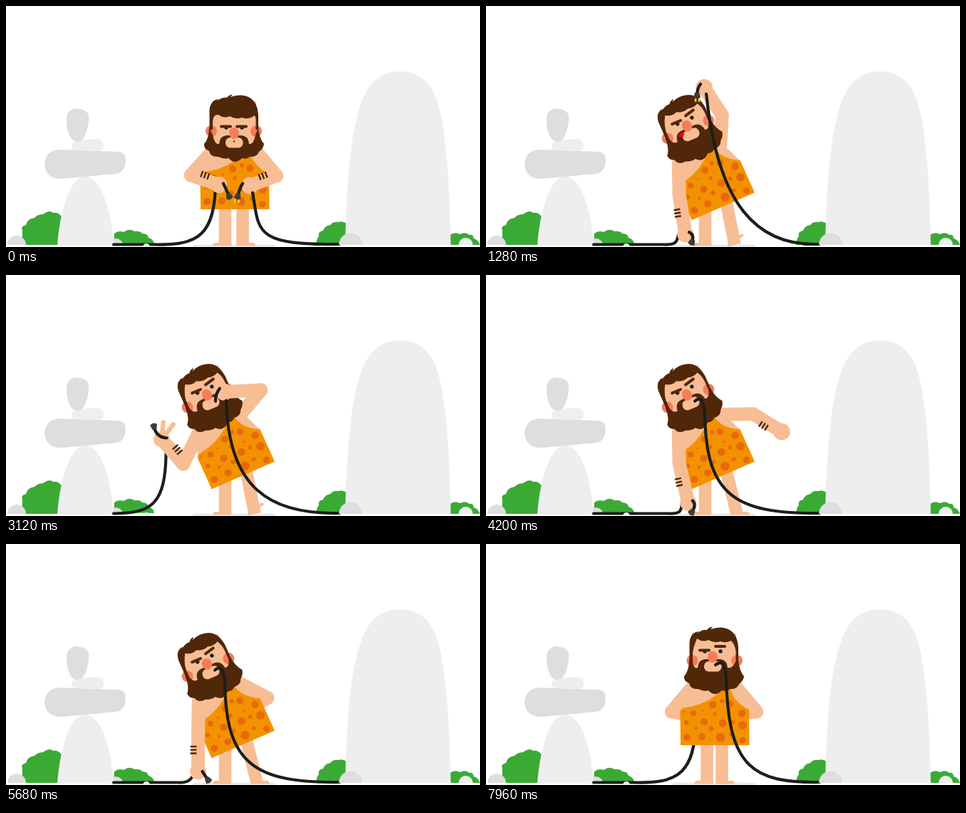
Write an HTML page that moves like this. It is 665 by 339 pixels and loops after 8000 ms.

```html
<!DOCTYPE html>
<html lang="en">
<head>
<meta charset="utf-8">
<title>Caveman with cables</title>
<style>
html, body { margin: 0; width: 100%; height: 100%; overflow: hidden; background: #fff; }
svg { display: block; width: 100%; height: 100%; }
.line { fill: none; stroke: #1d1d1b; stroke-width: 4.2; stroke-linecap: round; stroke-linejoin: round; }
.arm { stroke: #f7be95; stroke-width: 19; stroke-linecap: round; }
.leg { stroke: #f7be95; stroke-width: 17.6; }
.finger { stroke: #f7be95; stroke-width: 6.5; stroke-linecap: round; }
.mark { fill: none; stroke: #512709; stroke-width: 2.4; }
.brow { stroke: #512709; stroke-width: 4; stroke-linecap: round; }
.skin { fill: #f7be95; }
.hairy { fill: #512709; }
.pink { fill: #f47c5c; }
.dark { fill: #dedede; }
.pale { fill: #eeeeee; }
.bush { fill: #3aaa35; }
.clip { fill: #3c3c3b; }
</style>
</head>
<body>
<svg viewBox="0 0 665 339">
  <g id="scene">
    <path class="bush" d="M22 336L23 316Q20 310 28 308Q30 299 40 298Q44 293 52 293Q60 286 67 291Q73 290 78 296V336Z"/>
    <path class="dark" d="M2 336A13 13 0 0 1 28 336Z"/>
    <path class="bush" d="M151 334L152 320Q158 315 165 318Q173 312 180 317Q188 316 191 320Q199 320 200 326Q207 328 208 335Z"/>
    <path class="dark" d="M150 335V327Q162 326 164 335Z"/>
    <path class="pale" d="M72 337C75 290 90 240 110 240C135 240 148 290 151 337Z"/>
    <path class="dark" d="M54 222Q56 203 75 202L158 205Q168 206 168 217Q167 234 155 236L78 243Q56 244 54 222Z"/>
    <path class="pale" d="M92 197Q92 190 100 189L128 187Q137 188 137 197Q136 205 128 204L98 203Q92 202 92 197Z"/>
    <path class="dark" d="M85 158Q86 145 99 144Q113 145 116 153Q117 168 111 182Q107 191 99 191Q92 190 88 180Q84 168 85 158Z"/>
    <path class="bush" d="M435 336Q436 326 439 324Q437 317 445 316Q447 309 455 308Q459 303 466 304Q472 302 478 306V336Z"/>
    <path class="bush" d="M623 336V322Q630 317 637 321Q645 317 650 322Q656 321 656 327Q662 328 665 336Z"/>
    <path class="pale" d="M476 336C478 230 486 160 503 125Q518 92 553 92Q588 92 603 128C616 165 622 230 624 336Z"/>
    <path class="pale" d="M635 336A10 10 0 0 1 655 336Z"/>
    <rect x="262" y="335.5" width="116" height="3.5" rx="1.7" fill="#ebebeb"/>
  </g>
  <line id="upperR" class="arm"/>
  <g id="backSlot"></g>
  <line id="legL" class="leg" y1="275" y2="336"/>
  <line id="legR" class="leg" y1="275" y2="336"/>
  <path id="footL" class="skin" d="M8.7 1.5V-3H-13.5Q-17.5 -3 -17.5 1.5Z"/>
  <path id="footR" class="skin" d="M-8.7 1.5V-3H14Q18 -3 18 1.5Z"/>
  <g id="torso">
    <path class="skin" d="M288 193H352L369 234H273Z"/>
    <path fill="#f39200" d="M272.5 236Q273 231 280 230Q310 226 330 206L343 204Q347 222 369 233L369.5 283H273Z"/>
    <g id="spots" fill="#e8690b"></g>
  </g>
  <g id="frontSlot">
    <g id="left">
      <path id="cableL" class="line"/>
      <line id="upperL" class="arm"/>
      <line id="foreL" class="arm"/>
      <circle id="handL" class="skin" r="11.5"/>
      <line id="finger1" class="finger"/>
      <line id="finger2" class="finger"/>
      <path id="markL" class="mark"/>
      <path id="endL" class="line"/>
      <path id="clipL" class="clip" d="M-4 -3L3 -5L5 0L3 5L-4 3Z"/>
    </g>
  </g>
  <g id="head">
    <rect class="skin" x="289" y="126" width="62" height="64"/>
    <circle id="earL" class="pink" r="8"/>
    <circle id="earR" class="pink" r="8"/>
    <path id="hair" class="hairy"/>
    <path id="beard" class="hairy"/>
    <g id="face">
      <rect class="skin" x="308" y="165" width="24.5" height="14.5" rx="6.5"/>
      <path id="tongue" fill="#e30613" d="M303 168Q308 162 313 166L309 171Z"/>
      <circle id="lips" class="hairy" cx="320" cy="170.5" r="1.2"/>
      <circle cx="309" cy="151" r="2.7" fill="#1d1d1b"/>
      <circle cx="331" cy="151" r="2.7" fill="#1d1d1b"/>
      <line id="browL" class="brow" x1="302" x2="315"/>
      <line id="browR" class="brow" x1="324" x2="337"/>
      <ellipse class="pink" cx="320" cy="159" rx="7" ry="8"/>
    </g>
  </g>
  <g id="foreSlot">
    <g id="right">
      <line id="foreR" class="arm"/>
      <circle id="handR" class="skin" r="12"/>
      <path id="markR" class="mark"/>
    </g>
  </g>
  <path id="cableR" class="line"/>
  <path id="endR" class="line"/>
  <g id="clipR">
    <path d="M4 -3H9M4 2H9" stroke="#ffd500" stroke-width="2.6"/>
    <path class="clip" d="M-4 -3L3 -5L5 0L3 5L-4 3Z"/>
  </g>
  <path class="pale" d="M192 339A5 5 0 0 1 202 339Z"/>
  <path class="dark" d="M467 336A16.5 16.5 0 0 1 500 336Z"/>
</svg>
<script>
const LOOP = 8000, RAD = Math.PI / 180, TILT = -23.6;
const $ = {};
document.querySelectorAll('[id]').forEach(el => $[el.id] = el);
const set = (el, attrs) => { for (const k in attrs) el.setAttribute(k, attrs[k]); };

const spots = [
  [318, 226, 5], [331, 221, 3], [342, 225, 5], [291, 238, 4], [304, 234, 1.6], [321, 239, 2.7],
  [341, 240, 1.8], [359, 238, 5.3], [281, 251, 3.2], [306, 250, 5], [332, 252, 5.4], [346, 251, 3],
  [360, 255, 6], [295, 259, 2.2], [316, 260, 3.4], [282, 272, 5], [303, 271, 5], [329, 272, 6.3],
  [344, 268, 2.8], [360, 276, 4.6], [278, 236, 1.5]
];
$.spots.innerHTML = spots.map(([x, y, r]) => `<circle cx="${x}" cy="${y}" r="${r}"/>`).join('');

// Named poses of the arms: [upper angle, length, fore angle, length, side of the marks]
const armL = {
  hold: [132, 43, 19, 42, -1], down: [89, 43, 81, 57, 1], up: [116, 49, 229, 46, 1.1],
  low: [89, 43, 77, 57, 1], rest: [91, 43, 90, 55, 1], back: [130, 43, 10, 40, 0]
};
const armR = {
  hold: [50, 43, 160, 40, 1], up: [-87, 43, -123, 46, 0], mouth: [-50, 45, -183, 52, 0],
  out: [-1, 46, 32, 47, 1], rest: [28, 43, 150, 37, 0], back: [50, 43, 175, 38, 0]
};
// Cables: control points, then the offset of the gripped point
const wireL = {
  hold: [205, 262, 337, 290, 328, -5.5, 10], down: [250, 265, 336, 268, 333, -10, 1],
  up: [152, 205, 335, 224, 322, 6, 17], low: [255, 272, 336, 274, 333, -9, 2],
  rest: [242, 256, 336, 259, 331, -7, 6], back: [205, 262, 337, 290, 328, -6, 19]
};
const wireR = {
  hold: [350, 336, 355, 320, 4, 10], up: [380, 338, 325, 280, 3, 9], mouth: [370, 337, 312, 300, 3, 12],
  out: [350, 336, 308, 310, 19, 15], back: [375, 336, 340, 315, 18, 18]
};
// Free cable ends: start, control and tip as offsets
const tipL = {
  hold: [6, -2, 9, 4, 14, 16], down: [5, -3, 13, 1, 9, 11], up: [7, -2, -8, -3, -11, -18],
  low: [6, -3, 12, 3, 5, 13], rest: [6, 0, 9, 5, 14, 12], back: [6, 0, 9, 5, 14, 12]
};
const tipR = {
  hold: [-10, -3, -14, 3, -17, 15], up: [-5, -5, -10, 1, -10, 11], mouth: [-6, -5, -12, 2, -12, 13],
  out: [19, 15, 17, -13, 5, -3], back: [18, 18, 17, -13, 3, -2]
};

const cuesL = [[60, 'hold'], [750, 'down'], [2560, 'down'], [2950, 'up'], [3380, 'up'], [3800, 'low'],
  [4300, 'low'], [4900, 'rest'], [5900, 'rest'], [6450, 'back']];
const cuesR = [[60, 'hold'], [750, 'up'], [1350, 'up'], [1850, 'mouth'], [3420, 'mouth'], [3850, 'out'],
  [4280, 'out'], [4900, 'rest'], [5900, 'rest'], [6450, 'back']];
const cuesWire = [[60, 'hold'], [750, 'up'], [1350, 'up'], [1850, 'mouth'], [3400, 'mouth'], [3500, 'out'],
  [5900, 'out'], [6450, 'back']];
const track = (cues, poses) => cues.map(([t, name]) => [t, poses[name]]);

const tracks = {
  lean: [[60, [0]], [720, [1]], [5900, [1]], [6450, [0]]],
  // body drop, head drop, face drop
  drop: [[60, [3, 5, 12]], [600, [0, 0, 0]]],
  turn: [[7100, [0]], [7450, [-2]]],
  brow: [[200, [0, 0]], [700, [6, 3]], [5900, [6, 3]], [6400, [0, 0]], [7200, [0, 0]], [7450, [5.5, 0]]],
  // left foot, right hip, right ankle, heel lift
  legs: [[60, [307.5, 332, 332, 0]], [720, [307.5, 337, 349, -38]], [3450, [307.5, 337, 349, -38]],
    [3800, [307.5, 337, 352, 0]], [5900, [307.5, 337, 352, 0]], [6450, [310, 331, 331, 0]]],
  held: [[3400, [1]], [3500, [0]]],
  fingers: [[2700, [0]], [2950, [1]], [3380, [1]], [3550, [0]]],
  armL: track(cuesL, armL), wireL: track(cuesL, wireL), tipL: track(cuesL, tipL),
  armR: track(cuesR, armR), wireR: track(cuesWire, wireR), tipR: track(cuesWire, tipR)
};

const ease = u => u < .5 ? 4 * u * u * u : 1 - (2 - 2 * u) ** 3 / 2;
function at(name, t) {
  const keys = tracks[name];
  const i = keys.findIndex(k => k[0] > t);
  if (i === 0) return keys[0][1];
  if (i < 0) return keys[keys.length - 1][1];
  const [t0, a] = keys[i - 1], [t1, b] = keys[i];
  const u = ease((t - t0) / (t1 - t0));
  return a.map((v, j) => v + (b[j] - v) * u);
}

const polar = ([x, y], deg, len) => [x + Math.cos(deg * RAD) * len, y + Math.sin(deg * RAD) * len];
const line = (el, a, b) => set(el, { x1: a[0], y1: a[1], x2: b[0], y2: b[1] });

function drawArm(side, shoulder, [ua, ul, fa, fl, mark]) {
  const elbow = polar(shoulder, ua, ul), hand = polar(elbow, fa, fl);
  line($['upper' + side], shoulder, elbow);
  line($['fore' + side], elbow, hand);
  set($['hand' + side], { cx: hand[0], cy: hand[1] });
  const d = [-4.8, 0, 4.8].map(s => {
    const p = polar(elbow, fa, fl * .45 + s);
    return `M${polar(p, fa + 90, 11 * mark)}L${polar(p, fa + 90, 2 * mark)}`;
  }).join('');
  set($['mark' + side], { d });
  return hand;
}

function drawTip(side, [x, y], [x0, y0, cx, cy, x1, y1]) {
  set($['end' + side], { d: `M${x + x0} ${y + y0}Q${x + cx} ${y + cy} ${x + x1} ${y + y1}` });
  const angle = Math.atan2(y1 - cy, x1 - cx) / RAD;
  set($['clip' + side], { transform: `translate(${x + x1} ${y + y1}) rotate(${angle})` });
}

function drawHead(fx, fy, [raise, slope]) {
  const p = (x, y) => `${x + fx} ${y + fy} `;
  const earY = 164 + fy / 3;
  set($.earL, { cx: 288 - fx * .7, cy: earY });
  set($.earR, { cx: 351 - fx * .5, cy: earY });
  set($.hair, { d: 'M285.5 166V138Q287 124 299 123L296 126Q303 120 310 121Q312 117 318 116.5L315 120' +
    'Q322 117 330 117.5Q352 119 354 145V166H350.5V152Q350 143 ' + p(346, 136) +
    'Q' + p(338, 140) + p(331, 137) + 'Q' + p(322, 140) + p(314, 135) +
    'Q' + p(306, 139) + p(298, 133) + 'Q291 144 290 154V166Z' });
  set($.beard, { d: 'M285 163L290 ' + (166 + fy * .6) + 'Q' + p(293, 176) + p(299, 174) +
    'Q' + p(300, 163) + p(309, 162) + 'L' + p(331, 162) + 'Q' + p(340, 163) + p(341, 174) +
    'Q' + p(347, 176) + '350 ' + (166 + fy * .6) + 'L354 163Q355 178 362 186Q361 193 355 197' +
    'Q352 205 342 204Q338 208 331 206Q321 216 312 206Q306 208 298 204Q287 205 285 196' +
    'Q277 193 278 186Q285 178 285 163Z' });
  set($.face, { transform: `translate(${fx} ${fy})` });
  const left = 149.5 - raise * (slope / 3) * .2, right = 149.5 - raise;
  set($.browL, { y1: left, y2: left });
  set($.browR, { y1: right + slope / 2, y2: right - slope / 2 });
}

function move(el, slot) {
  if (el.parentNode !== slot) slot.appendChild(el);
}

function draw(t) {
  const [lean] = at('lean', t), [by, hy, fy] = at('drop', t), [fx] = at('turn', t);
  const a = TILT * lean, dx = 11.5 * lean, dy = by - lean;
  const place = (x, y) => {
    const c = Math.cos(a * RAD), s = Math.sin(a * RAD), u = x - 321, v = y - 283;
    return [321 + dx + u * c - v * s, 283 + dy + u * s + v * c];
  };
  const body = `translate(${dx} ${dy}) rotate(${a} 321 283)`;
  set($.torso, { transform: body });
  set($.head, { transform: `${body} translate(0 ${hy})` });
  drawHead(fx, fy, at('brow', t));
  $.tongue.style.display = t > 600 && t < 1900 ? '' : 'none';
  $.lips.style.display = t < 500 ? '' : 'none';

  const [lx, hip, rx, heel] = at('legs', t);
  set($.legL, { x1: lx, x2: lx });
  set($.legR, { x1: hip, x2: rx });
  set($.footL, { transform: `translate(${lx} 336)` });
  set($.footR, { transform: `translate(${rx} 336) rotate(${heel} -6 1)` });

  move($.left, t < 6050 ? $.frontSlot : $.backSlot);
  move($.right, t < 4500 ? $.foreSlot : $.backSlot);

  const handL = drawArm('L', place(288, 203), at('armL', t));
  const handR = drawArm('R', place(352, 203), at('armR', t));
  const [f] = at('fingers', t);
  line($.finger1, handL, [handL[0] + 2 * f, handL[1] - 24 * f]);
  line($.finger2, handL, [handL[0] + 16 * f, handL[1] - 21 * f]);

  const l = at('wireL', t);
  set($.cableL, { d: `M151 335.5H${l[0]}C${l[1]} ${l[2]} ${l[3]} ${l[4]} ${handL[0] + l[5]} ${handL[1] + l[6]}` });
  drawTip('L', handL, at('tipL', t));

  const [held] = at('held', t), mouth = place(321 + fx, 172);
  const grip = mouth.map((v, i) => v + (handR[i] - v) * held);
  const r = at('wireR', t);
  set($.cableR, { d: `M468 335H467C${r[0]} ${r[1]} ${r[2]} ${r[3]} ${grip[0] + r[4]} ${grip[1] + r[5]}` });
  drawTip('R', grip, at('tipR', t));
  $.clipR.style.display = t < 1750 ? '' : 'none';
}

const start = performance.now();
function tick() {
  draw((performance.now() - start) % LOOP);
  requestAnimationFrame(tick);
}
tick();
</script>
</body>
</html>
```
